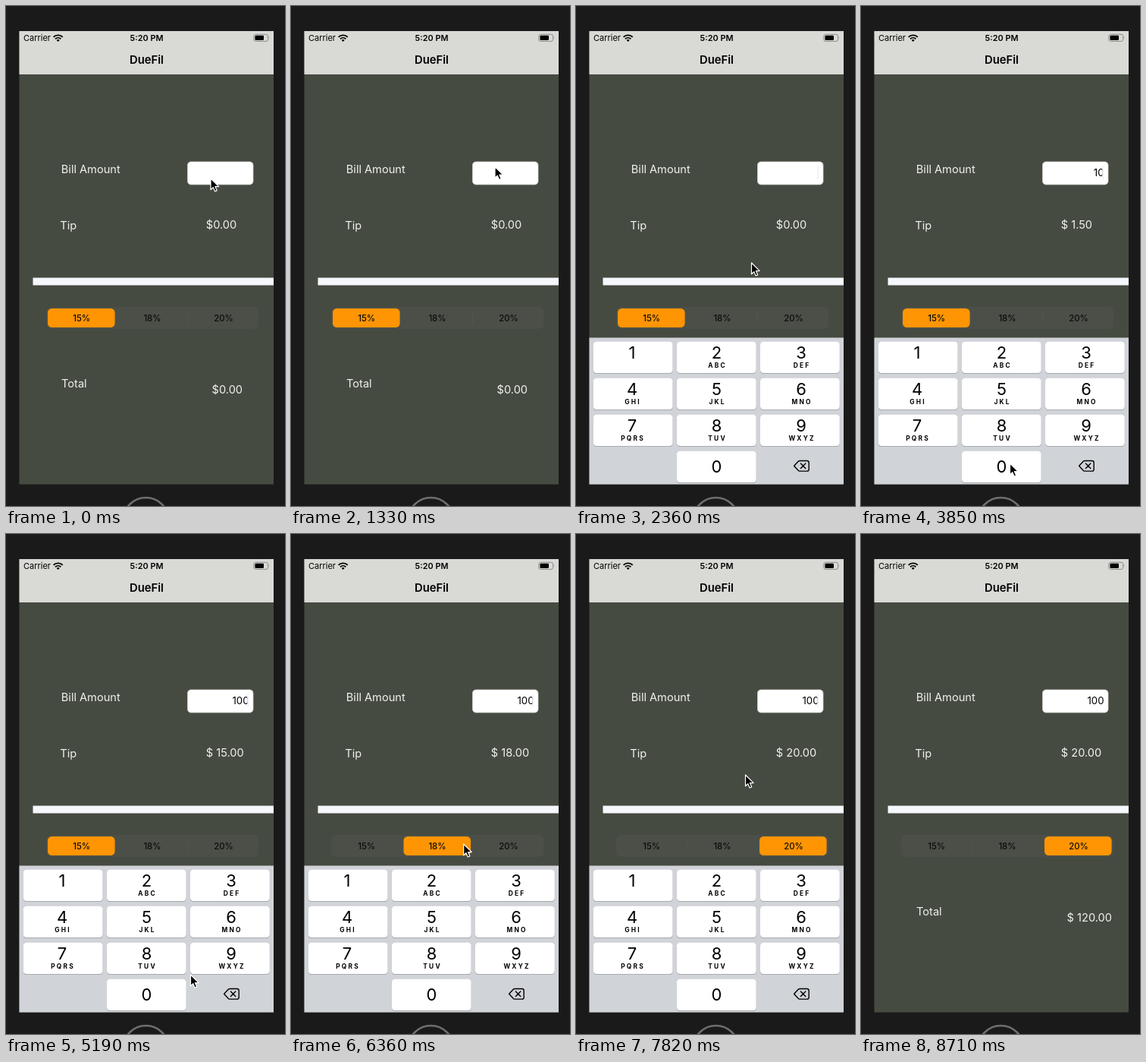
Write an HTML page that moves like this. It is 368x658 px and loops after 9160 ms.

```html
<!DOCTYPE html>
<html lang="en">
<head>
<meta charset="utf-8">
<title>Tip calculator</title>
<style>
html, body { margin: 0; width: 100%; height: 100%; overflow: hidden; background: #1a1a1a; }
svg { display: block; width: 368px; height: 658px; font-family: Inter, Roboto, sans-serif; }
.label { font-size: 14.6px; fill: #f1f1ef; }
.mid { text-anchor: middle; }
.bold { font-weight: 600; }
.seg { font-size: 11.4px; font-weight: 500; fill: #0c0d0b; }
.digit { font-size: 22px; }
.abc { font-size: 8.4px; font-weight: 700; letter-spacing: 2.2px; }
</style>
</head>
<body>
<svg viewBox="0 0 368 658">
  <defs>
    <clipPath id="screen"><rect x="17.5" y="33" width="335.5" height="596.5"/></clipPath>
  </defs>
  <rect width="368" height="658" fill="#1a1a1a"/>
  <circle cx="184.5" cy="677" r="30" fill="none" stroke="#6e6e6e" stroke-width="2.6"/>

  <g clip-path="url(#screen)">
    <rect x="17" y="33" width="337" height="597" fill="#464b41"/>
    <rect x="17" y="33" width="337" height="57" fill="#d9d9d5"/>

    <!-- status and title bars -->
    <text x="23" y="46" font-size="11">Carrier</text>
    <g fill="none" stroke="#000" stroke-width="1.9">
      <path d="M62.6 40.9a8.7 8.7 0 0 1 12.2 0"/>
      <path d="M65 43.4a5.3 5.3 0 0 1 7.4 0"/>
    </g>
    <path d="M66.7 44.9a2.9 2.9 0 0 1 4 0l-2 2.1z"/>
    <text class="mid bold" x="185.5" y="46" font-size="10.9">5:20 PM</text>
    <rect x="326.8" y="37.3" width="18.8" height="9.2" rx="2.6" fill="none" stroke="#858583" stroke-width=".9"/>
    <rect x="328.4" y="38.8" width="11.6" height="6.2" rx="1.3"/>
    <path d="M346.7 40.3q1.5 1.6 0 3.2z" fill="#858583"/>
    <text class="mid bold" x="185.5" y="76.2" font-size="14.8">DueFil</text>

    <!-- bill and tip -->
    <text class="label" x="72.8" y="219.8">Bill Amount</text>
    <rect x="239.5" y="205" width="86.5" height="30" rx="4.5" fill="#fff" stroke="#d0d2ce" stroke-width=".8"/>
    <text id="bill" x="320.5" y="224.2" font-size="13.2" text-anchor="end"></text>
    <g id="caret">
      <rect x="318.4" y="209" width="4" height="21" fill="#fff"/>
      <rect x="318.6" y="211" width="1.3" height="17" fill="#eceef3"/>
    </g>
    <text class="label" x="71.3" y="293.8">Tip</text>
    <text class="label" id="tip" x="263.8" y="293"></text>
    <rect x="35.5" y="357.6" width="320" height="9.9" fill="#f5f7fa"/>

    <!-- rate picker -->
    <rect x="53" y="396" width="280.5" height="29" rx="7" fill="#4b4f48"/>
    <rect id="sep0" x="145.6" y="403" width="1" height="15" fill="#51554d"/>
    <rect id="sep1" x="239" y="403" width="1" height="15" fill="#51554d"/>
    <rect id="pick" x="55" y="398" width="88.6" height="25" rx="5.5" fill="#ff9502"/>
    <text class="seg mid" x="99.7" y="414.8">15%</text>
    <text class="seg mid" x="193" y="414.8">18%</text>
    <text class="seg mid" x="287" y="414.8">20%</text>

    <text class="label" x="73" y="502.2">Total</text>
    <text class="label" id="total" x="271.6" y="509.5"></text>

    <g id="pad">
      <rect x="17" y="436.5" width="337" height="200" fill="#d0d3d8"/>
      <g id="keys"></g>
      <path d="M287.6 605.3l5.6-6q.8-.8 1.8-.8h9.8q2.4 0 2.4 2.4v8.8q0 2.4-2.4 2.4h-9.8q-1 0-1.8-.8zM296.4 602l6.4 6.6m0-6.6l-6.4 6.6"
        fill="none" stroke="#000" stroke-width="1.4" stroke-linejoin="round" stroke-linecap="round"/>
    </g>
  </g>

  <path id="cursor" d="M0 0V14.8L3.3 11.7 5.6 17 8.2 15.9 5.9 10.6H10.7Z" fill="#000" stroke="#fff" stroke-width="1.2" stroke-linejoin="round"/>
</svg>

<script>
const LOOP = 9160, STEPS = 62;
const $ = id => document.getElementById(id);

// Keypad
const letters = ['', 'ABC', 'DEF', 'GHI', 'JKL', 'MNO', 'PQRS', 'TUV', 'WXYZ'];
function key(digit, col, row) {
  const x = 22.8 + col * 110.1, y = 441.8 + row * 48, mid = 74 + col * 111.5;
  const box = (dy, more) => `<rect x="${x}" y="${y + dy}" width="104.8" height="41.4" rx="4.5" ${more}/>`;
  const abc = letters[digit - 1] || '';
  return box(.9, 'fill="#8b8e93"') + box(0, `id="key${digit}" fill="#fff"`) +
    `<text class="digit mid" x="${mid}" y="${y + (abc || row < 3 ? 22.2 : 28)}">${digit}</text>` +
    `<text class="abc mid" x="${mid + 1.1}" y="${y + 34.6}">${abc}</text>`;
}
$('keys').innerHTML = letters.map((_, i) => key(i + 1, i % 3, Math.floor(i / 3))).join('') + key(0, 1, 3);

// Steps at which things are pressed
const TAP_FIELD = 12, TAP_1 = 20, TAP_0 = 26, TAP_00 = 31, TAP_18 = 40, TAP_20 = 47, TAP_AWAY = 53;

// Pointer moves: first step, last step, destination
const moves = [
  { from: 0, to: 2, x: 270, y: 214 },
  { from: 5, to: 9, x: 269, y: 211.5 },
  { from: TAP_FIELD, to: 16, x: 231.5, y: 338 },
  { from: 16, to: TAP_1, x: 70, y: 456 },
  { from: TAP_1 + 1, to: 25, x: 190, y: 627 },
  { from: 25, to: TAP_0, x: 196.5, y: 602 },
  { from: TAP_00 - 1, to: 35, x: 243.5, y: 580 },
  { from: 35, to: 39, x: 196, y: 408 },
  { from: TAP_18 + 1, to: 46, x: 286, y: 408 },
  { from: TAP_20, to: 51, x: 223.5, y: 317 },
  { from: TAP_AWAY, to: 59, x: 300, y: 700 }
];

// Smooth rise from 0 to 1 between two steps
function ease(n, from, to) {
  const u = Math.min(1, Math.max(0, (n - from) / (to - from)));
  return u * u * (3 - 2 * u);
}

function pointer(n) {
  let x = 270, y = 227;
  for (const m of moves) {
    const e = ease(n, m.from, m.to);
    x += (m.x - x) * e;
    y += (m.y - y) * e;
  }
  return [x, y];
}

const money = v => v ? '$ ' + v.toFixed(2) : '$0.00';
const show = (id, on) => $(id).setAttribute('visibility', on ? 'visible' : 'hidden');
const move = (id, x, y) => $(id).setAttribute('transform', `translate(${x} ${y})`);

function draw(n) {
  const bill = n <= TAP_1 ? 0 : n < TAP_0 ? 1 : n < TAP_00 ? 10 : 100;
  const rate = n < TAP_18 ? .15 : n < TAP_20 ? .18 : .2;
  const choice = ease(n, TAP_18 - 1, TAP_18 + 1) + ease(n, TAP_20 - 1, TAP_20 + 1);
  const hidden = 1 - ease(n, TAP_FIELD, TAP_FIELD + 1.5) + ease(n, TAP_AWAY, TAP_AWAY + 4);
  $('bill').textContent = bill || '';
  $('tip').textContent = money(bill * rate);
  $('total').textContent = money(bill * (1 + rate));
  show('caret', n > TAP_FIELD && n <= TAP_AWAY);
  show('sep0', choice === 2);
  show('sep1', choice === 0);
  move('pick', choice * 93.5, 0);
  move('pad', 0, hidden * 200);
  $('key1').setAttribute('fill', n === TAP_1 ? '#b4b8c1' : '#fff');
  move('cursor', ...pointer(n));
}

const start = performance.now();
function tick() {
  const t = (performance.now() - start) % LOOP;
  draw(Math.min(STEPS - 1, Math.floor((t + 9) / LOOP * STEPS)));
  requestAnimationFrame(tick);
}
tick();
</script>
</body>
</html>
```
